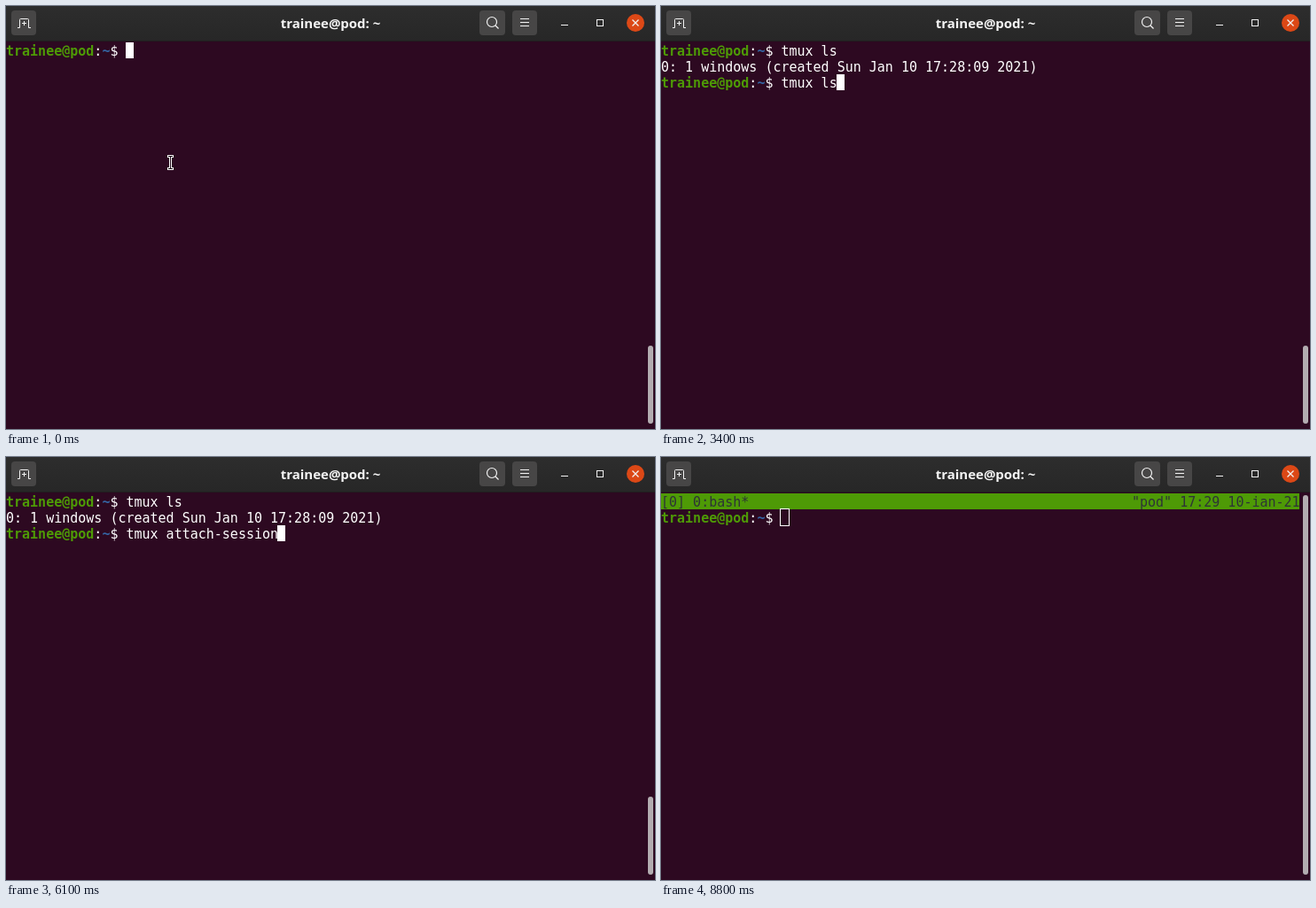
These frames come from a looping animation (732 px wide and 477 px high, 8.9 s). An HTML page:

```html
<!DOCTYPE html>
<html lang="en">
<head>
<meta charset="utf-8">
<title>Terminal</title>
<style>
html, body { margin: 0; width: 100%; height: 100%; overflow: hidden; background: #2d0921; }
#stage { position: relative; width: 732px; height: 477px; overflow: hidden; }
#stage > * { position: absolute; }
#bar { left: 0; top: 0; width: 732px; height: 40px; background: linear-gradient(#2d2d2d, #272727 39px, #201e1f 39px); }
#title {
  left: 0; top: 9px; width: 732px; text-align: center; color: #f4f4f4;
  font: bold 15px/20px "Open Sans", "Noto Sans", sans-serif;
}
#icons { left: 0; top: 0; }
.row {
  left: 0; height: 18px; white-space: pre; color: #fff;
  font: 15px/20px "DejaVu Sans Mono", "Noto Sans Mono", monospace;
}
.row b { color: #4e9a06; }
.row i { color: #3465a4; font-style: normal; font-weight: bold; }
#status { top: 41px; width: 720px; background: #4e9a06; color: #2e3436; }
#status span { position: absolute; left: 531px; }
#caret { box-sizing: border-box; width: 9px; height: 18px; background: #fff; }
#caret.hollow { width: 11px; height: 20px; margin: -1px; background: none; border: 1px solid #fff; }
#scroll { left: 724px; width: 6px; bottom: 6px; border-radius: 3px; background: #b3adb1; }
#beam { left: 0; top: 0; }
[hidden] { display: none; }
</style>
</head>
<body>
<div id="stage">
  <div id="bar"></div>
  <div id="title">trainee@pod: ~</div>
  <svg id="icons" width="732" height="40" fill="none" stroke="#f2f2f2">
    <g fill="#474646" stroke="none">
      <rect x="6" y="5" width="28" height="28" rx="4"/>
      <rect x="534" y="5" width="29" height="28" rx="4"/>
      <rect x="571" y="5" width="28" height="28" rx="4"/>
    </g>
    <path d="M13 24.500h2.500v-9q0-1 1-1h8q1 0 1 1v9h2.500M20.500 17v5M18 19.500h5"/>
    <circle cx="548" cy="18" r="5.500" stroke-width="1.200"/>
    <path d="M552 22l3.500 3.500" stroke-width="1.300"/>
    <path d="M580 14.500h10M580 18.500h10M580 22.500h10M626 21.500h8"/>
    <rect x="666.500" y="15.500" width="7" height="7"/>
    <circle cx="710" cy="19" r="10" fill="#dc4816" stroke="none"/>
    <path d="M706.500 15.500l7 7m0-7l-7 7" stroke-width="1.300"/>
  </svg>
  <div id="first" class="row" style="top:41px"></div>
  <div id="list" class="row" style="top:59px">0: 1 windows (created Sun Jan 10 17:28:09 2021)</div>
  <div id="second" class="row" style="top:77px"></div>
  <div id="status" class="row">[0] 0:bash*<span>"pod" 17:29 10-ian-21</span></div>
  <div id="inner" class="row" style="top:59px"></div>
  <div id="caret"></div>
  <div id="scroll"></div>
  <svg id="beam" width="7" height="17" fill="none">
    <path d="M1.500 1.500h4M3.500 1.500v14M1.500 15.500h4" stroke="#fff" stroke-width="3" stroke-linecap="square"/>
    <path d="M1.500 1.500h4M3.500 1.500v14M1.500 15.500h4" stroke="#1c0615" stroke-linecap="square"/>
  </svg>
</div>
<script>
const LOOP = 8900, CELL = 9, PROMPT_X = 135;
const OUTPUT = 2200, RECALL = 3400, ERASE = 3800, GROW = 7400, ATTACH = 7500, BLUR = 8800;
const LIST_CMD = 'tmux ls', ATTACH_CMD = 'tmux attach-session -t 0';
const listKeys = [700, 900, 1300, 1400, 1600, 1700, 1900];
const attachKeys = [4000, 4100, 4400, 4500, 4800, 5000, 5300, 5300, 5500, 5700,
  5800, 5900, 6000, 6100, 6500, 6600, 7000, 7200, 7400];
const path = [[182, 168], [139, 120], [287, 72], [525, 35]];

const els = {};
for (const id of ['first', 'list', 'second', 'status', 'inner', 'caret', 'scroll', 'beam']) {
  els[id] = document.getElementById(id);
}

const typed = {};
for (const id of ['first', 'second', 'inner']) {
  els[id].innerHTML = '<b>trainee@pod</b>:<i>~</i>$ <span></span>';
  typed[id] = els[id].querySelector('span');
}

const pressed = (keys, t) => keys.filter(k => k <= t).length;

function secondText(t) {
  if (t < RECALL) return '';
  if (t < ERASE) return LIST_CMD;
  return ATTACH_CMD.slice(0, 5 + pressed(attachKeys, t));
}

function pointer(t) {
  if (t < 500) return path[0];
  return t < 8000 ? null : path[Math.floor((t - 8000) / 100)];
}

function draw(t) {
  const attached = t >= ATTACH, listed = t >= OUTPUT;
  const one = LIST_CMD.slice(0, pressed(listKeys, t)), two = secondText(t);
  typed.first.textContent = one;
  typed.second.textContent = two;
  els.first.hidden = attached;
  els.list.hidden = els.second.hidden = !listed || attached;
  els.status.hidden = els.inner.hidden = !attached;

  const col = attached ? 0 : listed ? two.length : one.length;
  els.caret.style.left = PROMPT_X + CELL * col + 'px';
  els.caret.style.top = (attached ? 59 : listed ? 77 : 41) + 'px';
  els.caret.className = t >= BLUR ? 'hollow' : '';
  els.scroll.style.top = (t >= GROW ? 43 : 383) + 'px';

  const at = pointer(t);
  els.beam.style.visibility = at ? 'visible' : 'hidden';
  if (at) els.beam.style.transform = `translate(${at[0]}px, ${at[1]}px)`;
}

const start = performance.now();
function tick() {
  draw((performance.now() - start) % LOOP);
  requestAnimationFrame(tick);
}
tick();
</script>
</body>
</html>
```
